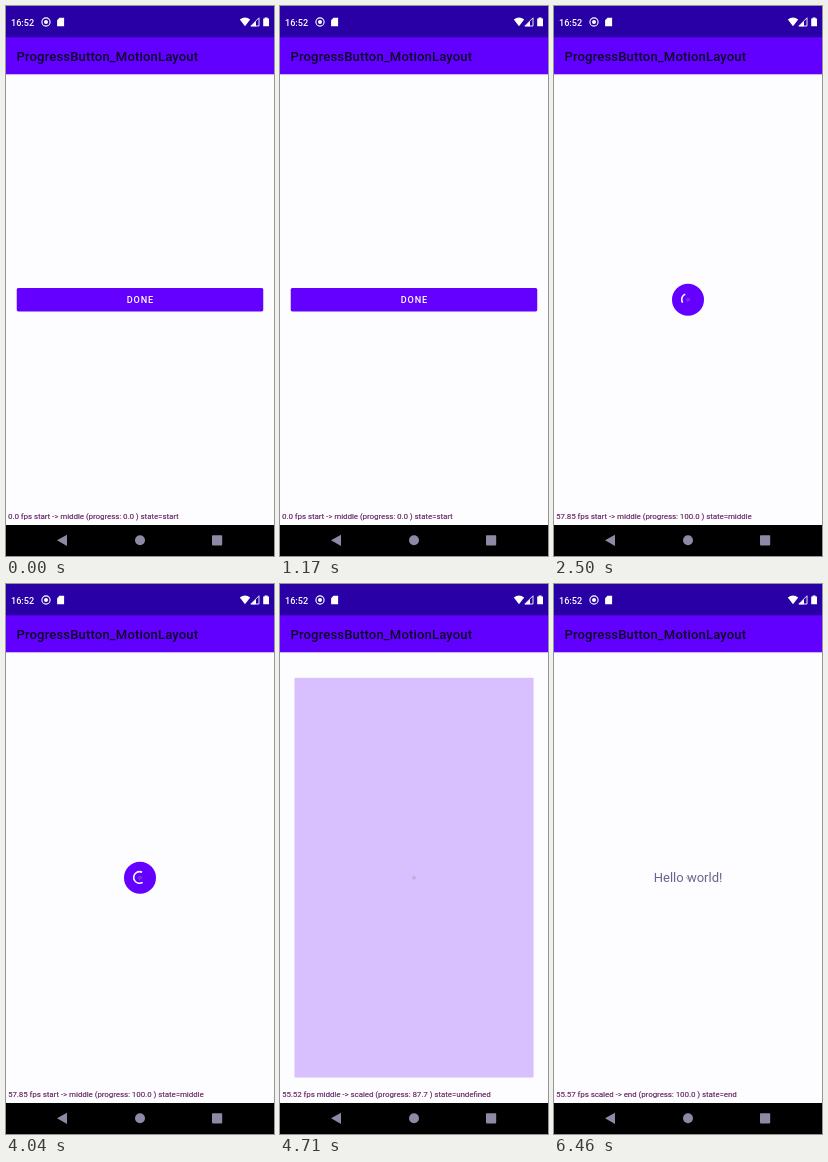
An HTML page for the animation above (6670 ms loop, 268 px wide and 550 px high).

```html
<!DOCTYPE html>
<html lang="en">
<head>
<meta charset="utf-8">
<title>Progress button</title>
<style>
  html, body { margin: 0; width: 100%; height: 100%; overflow: hidden; background: #fdfdff; }
  svg { display: block; width: 268px; height: 550px; }
  text { font-family: Roboto, "Noto Sans", sans-serif; white-space: pre; }
  .medium { font-weight: 500; }
  .debug { font-size: 7.83px; }
</style>
</head>
<body>
<svg viewBox="0 0 268 550">
  <rect width="268" height="550" fill="#fdfdff"/>

  <!-- content -->
  <rect id="button" fill="#6400ff"/>
  <text id="label" class="medium" x="120.8" y="297.2" font-size="9.13" letter-spacing=".815" fill="#fff">DONE</text>
  <circle id="spinner" cx="133.5" cy="293.5" r="5.8" fill="none" stroke="#fff" stroke-width="1.6" pathLength="360"/>
  <text id="hello" x="99.7" y="298.4" font-size="13.04" fill="#68648c">Hello world!</text>
  <path id="marker" d="M134 292.2l1.6 1.6-1.6 1.6-1.6-1.6z" fill="none" stroke="#ad8794" stroke-width=".7"/>
  <text class="debug" x="2.2" y="513.2" fill="#000" opacity=".45"></text>
  <text class="debug" x="2" y="513" fill="#742a72"></text>

  <!-- app bar -->
  <rect y="31" width="268" height="37.3" fill="#6200ff"/>
  <text class="medium" x="10.5" y="55.3" font-size="13.04" letter-spacing=".163" fill="#0c0024">ProgressButton_MotionLayout</text>

  <!-- status bar -->
  <rect width="268" height="31.3" fill="#2800a6"/>
  <g fill="#fff">
    <text class="medium" x="5" y="19.6" font-size="9.13">16:52</text>
    <circle cx="40" cy="16" r="4.1" fill="none" stroke="#fff" stroke-width="1.1"/>
    <circle cx="40" cy="16" r="2"/>
    <path d="M53.5 11.8h4.6v8.4h-7v-6z"/>
    <path d="M233.8 13.6q5.2-4 10.4 0l-5.2 6.6z"/>
    <path d="M253 11.8v8.2h-8.2z" fill="none" stroke="#fff" stroke-width=".9"/>
    <path d="M250 15.2v5h-5z"/>
    <path d="M258.6 11.5h3v1h1.4v7.8h-5.8v-7.8h1.4z"/>
  </g>

  <!-- navigation bar -->
  <rect y="519" width="268" height="31" fill="#000"/>
  <g fill="#9089a6">
    <path d="M51 534.3l10-5.6v11.2z"/>
    <circle cx="134" cy="534.3" r="5"/>
    <rect x="206" y="529.2" width="10.2" height="10.2" rx=".8"/>
  </g>
</svg>
<script>
const LOOP = 6670, DURATION = 500;
const SHRINK = 1410, EXPAND = 4410, REVEAL = 4908.8;
const SPIN_CYCLE = 1333, SPIN_START = 2300;

const $ = id => document.getElementById(id);
const debugLines = document.querySelectorAll('.debug');
const clamp = x => Math.min(1, Math.max(0, x));
const mix = (a, b, p) => a + (b - a) * p;

function set(id, attrs) {
  for (const name in attrs) $(id).setAttribute(name, attrs[name]);
}

// cubic-bezier(.4, 0, .2, 1)
function ease(x) {
  x = clamp(x);
  if (x === 0 || x === 1) return x;
  let lo = 0, hi = 1;
  for (let i = 0; i < 30; i++) {
    const s = (lo + hi) / 2;
    if (1.2 * s - 1.8 * s * s + 1.6 * s ** 3 < x) lo = s; else hi = s;
  }
  return 3 * lo * lo - 2 * lo ** 3;
}

const progress = (t, start) => ease((t - start) / DURATION);

function debugText(t, shrink, expand, reveal) {
  let fps, from, to, p;
  if (t < EXPAND) {
    [fps, from, to, p] = [t < SHRINK + 250 ? '0.0' : '57.85', 'start', 'middle', shrink];
  } else if (t < REVEAL) {
    [fps, from, to, p] = [t < EXPAND + 250 ? '2.84' : '55.52', 'middle', 'scaled', expand];
  } else {
    [fps, from, to, p] = [t < REVEAL + 250 ? '55.52' : '55.57', 'scaled', 'end', reveal];
  }
  const state = p === 0 ? from : p === 1 ? to : 'undefined';
  const percent = (Math.floor(p * 1000) / 10).toFixed(1);
  return `${fps} fps ${from} -> ${to} (progress: ${percent} ) state=${state}`;
}

function drawButton(shrink, expand) {
  const w = mix(mix(246.5, 32, shrink), 268, expand);
  const h = mix(mix(23.4, 32, shrink), 451, expand);
  set('button', {
    x: 134 - w / 2, y: 293.7 - h / 2, width: w, height: h,
    rx: mix(1.6, 16, shrink) * clamp(1 - expand * 2),
    opacity: clamp(2 - 2 * expand)
  });
}

function drawSpinner(t, opacity) {
  const phase = ((t - SPIN_START) / SPIN_CYCLE + 10) % 1;
  const head = 270 * ease(phase * 2);
  const tail = 270 * ease(phase * 2 - 1);
  const length = Math.max(4, head - tail);
  const angle = 147 + (t - 2500) * 0.1753 + tail;
  set('spinner', {
    'stroke-dasharray': `${length} ${360 - length}`,
    transform: `rotate(${angle} 133.5 293.5)`,
    opacity
  });
}

function frame(now) {
  const t = now % LOOP;
  const shrink = progress(t, SHRINK);
  const expand = progress(t, EXPAND);
  const reveal = progress(t, REVEAL);

  drawButton(shrink, expand);
  drawSpinner(t, shrink * clamp(1 - expand * 2));
  set('label', { opacity: 1 - shrink });
  set('hello', { opacity: reveal });
  set('marker', { opacity: t < SHRINK ? 0 : 1 });

  const text = debugText(t, shrink, expand, reveal);
  debugLines.forEach(line => { line.textContent = text; });
  requestAnimationFrame(() => frame(performance.now() - origin));
}

const origin = performance.now();
frame(0);
</script>
</body>
</html>
```
